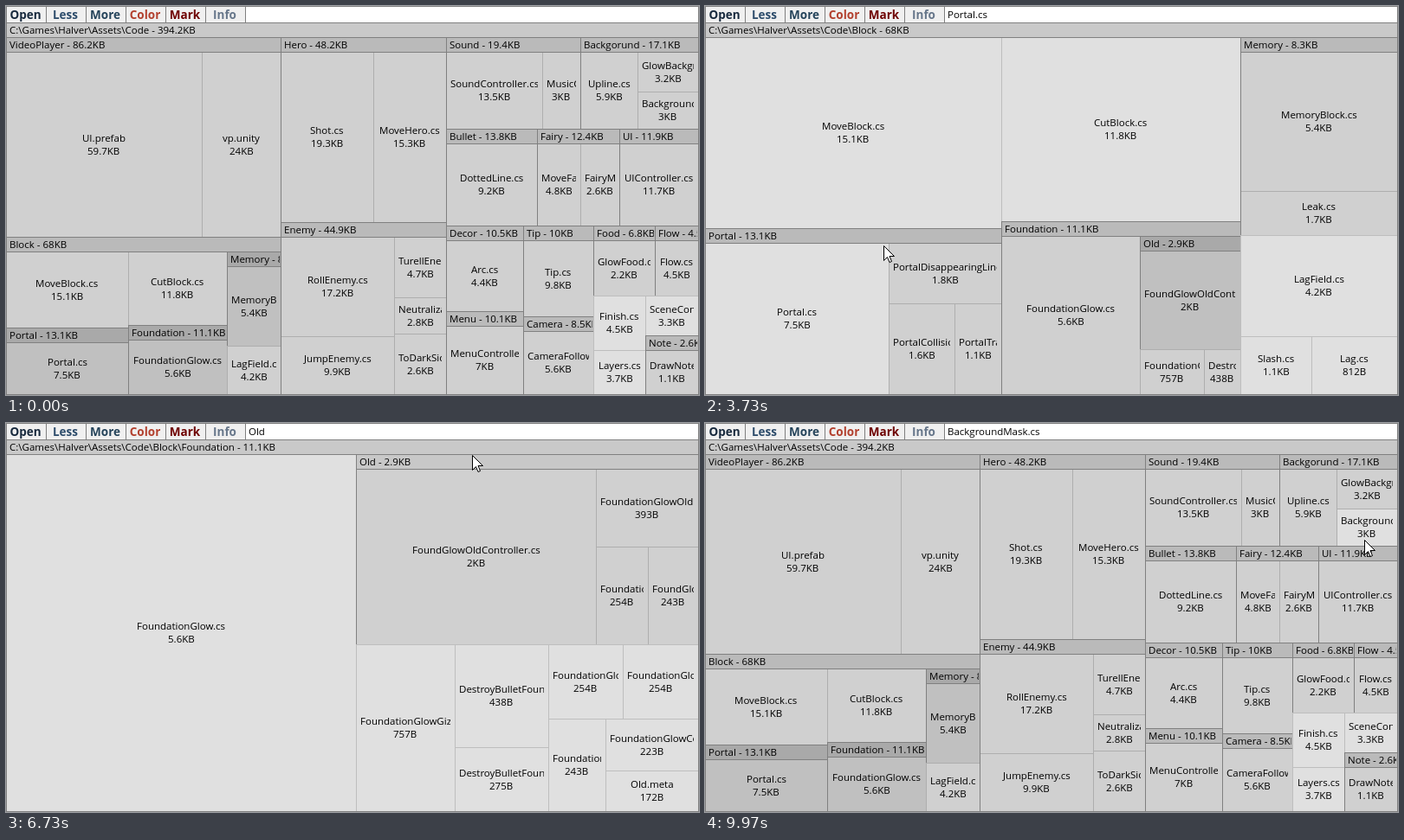
An HTML page with a canvas for the animation above (10 s loop, 800 px wide and 450 px high).

```html
<!DOCTYPE html>
<html lang="en">
<head>
<meta charset="utf-8">
<title>Folder treemap</title>
<style>
  html, body { margin: 0; height: 100%; overflow: hidden; background: #fff; }
  canvas { display: block; }
</style>
</head>
<body>
<canvas id="stage" width="800" height="450"></canvas>
<script>
const ctx = document.getElementById('stage').getContext('2d');
const LOOP = 10000, HEADER = 17;
const FONT = '11.5px "Open Sans", sans-serif';
const BOLD = 'bold 13.5px "Open Sans", sans-serif';
const TILE = [224, 208, 192], HEAD = [201, 186, 169];

// A layout is a file string, a folder, or a split whose items alternate with cut positions.
const across = (...items) => ({ axis: 'x', items });
const down = (...items) => ({ axis: 'y', items });
const folder = (label, child) => ({ label, child });

const code = folder('C:\\Games\\Halver\\Assets\\Code 394.2KB', across(
  down(
    folder('VideoPlayer 86.2KB', across('UI.prefab 59.7KB', 226, 'vp.unity 24KB')), 267,
    folder('Block 68KB', across(
      down('MoveBlock.cs 15.1KB', 372, folder('Portal 13.1KB', 'Portal.cs 7.5KB')), 141,
      down('CutBlock.cs 11.8KB', 369, folder('Foundation 11.1KB', 'FoundationGlow.cs 5.6KB')), 255,
      down(folder('Memory 8.3KB', 'MemoryBlock.cs 5.4KB'), 393, 'LagField.cs 4.2KB')))), 317,
  down(
    folder('Hero 48.2KB', across('Shot.cs 19.3KB', 424, 'MoveHero.cs 15.3KB')), 250,
    folder('Enemy 44.9KB', across(
      down('RollEnemy.cs 17.2KB', 382, 'JumpEnemy.cs 9.9KB'), 448,
      down('TurellEnemy.cs 4.7KB', 337, 'NeutralizationEnemy.cs 2.8KB', 379, 'ToDarkSide.cs 2.6KB')))), 508,
  down(
    across(
      folder('Sound 19.4KB', across('SoundController.cs 13.5KB', 619, 'MusicController.cs 3KB')), 663,
      folder('Backgorund 17.1KB', across('Upline.cs 5.9KB', 729,
        down('GlowBackground.cs 3.2KB', 99, 'BackgroundMask.cs 3KB')))), 142,
    across(
      folder('Bullet 13.8KB', 'DottedLine.cs 9.2KB'), 613,
      folder('Fairy 12.4KB', across('MoveFairy.cs 4.8KB', 663, 'FairyMagic.cs 2.6KB')), 708,
      folder('UI 11.9KB', 'UIController.cs 11.7KB')), 254,
    across(
      down(folder('Decor 10.5KB', 'Arc.cs 4.4KB'), 353, folder('Menu 10.1KB', 'MenuController.cs 7KB')), 597,
      down(folder('Tip 10KB', 'Tip.cs 9.8KB'), 359, folder('Camera 8.5KB', 'CameraFollow.cs 5.6KB')), 678,
      down(
        across(folder('Food 6.8KB', 'GlowFood.cs 2.2KB'), 749, folder('Flow 4.5KB', 'Flow.cs 4.5KB')), 335,
        across(
          down('Finish.cs 4.5KB', 398, 'Layers.cs 3.7KB'), 738,
          down('SceneController.cs 3.3KB', 381, folder('Note 2.6KB', 'DrawNote.cs 1.1KB'))))))));

const block = folder('C:\\Games\\Halver\\Assets\\Code\\Block 68KB', across(
  down('MoveBlock.cs 15.1KB', 257,
    folder('Portal 13.1KB', across('Portal.cs 7.5KB', 212,
      down('PortalDisappearingLine.cs 1.8KB', 344,
        across('PortalCollision.cs 1.6KB', 288, 'PortalTrail.cs 1.1KB'))))), 342,
  down('CutBlock.cs 11.8KB', 249,
    folder('Foundation 11.1KB', across('FoundationGlow.cs 5.6KB', 502,
      down(folder('Old 2.9KB', 'FoundGlowOldController.cs 2KB'), 397,
        across('FoundationGlowGizmo.cs 757B', 576, 'DestroyBulletFoundation.cs 438B'))))), 618,
  down(folder('Memory 8.3KB', down('MemoryBlock.cs 5.4KB', 214, 'Leak.cs 1.7KB')), 265,
    'LagField.cs 4.2KB', 382, across('Slash.cs 1.1KB', 700, 'Lag.cs 812B'))));

const foundation = folder('C:\\Games\\Halver\\Assets\\Code\\Block\\Foundation 11.1KB', across(
  'FoundationGlow.cs 5.6KB', 404,
  down(
    folder('Old 2.9KB', across('FoundGlowOldController.cs 2KB', 681,
      down('FoundationGlowOld.cs 393B', 143,
        across('FoundationGlow.cs.meta 254B', 741, 'FoundGlowOld.cs.meta 243B')))), 256,
    across('FoundationGlowGizmo.cs 757B', 518,
      down('DestroyBulletFoundation.cs 438B', 375, 'DestroyBulletFoundation.cs.meta 275B'), 626,
      down(
        across('FoundationGlow.cs.meta 254B', 712, 'FoundationGlowGizmo.cs.meta 254B'), 342,
        across('Foundation.prefab.meta 243B', 692,
          down('FoundationGlowColor.cs 223B', 402, 'Old.meta 172B')))))));

// Each click opens another folder.
const views = [[0, code], [3350, block], [4750, foundation], [7600, block], [8700, code]];

const mousePath = [
  [30, 799, 200], [1000, 560, 330], [2060, 372, 160], [3090, 204, 276], [3500, 204, 276],
  [3700, 206, 277], [3760, 206, 277], [4600, 367, 259], [5270, 367, 259], [5600, 330, 330],
  [5950, 500, 400], [6300, 560, 190], [6730, 538, 37], [7300, 470, 27], [7900, 470, 27],
  [8360, 456, 27], [8800, 456, 27], [9970, 761, 135]
];

const buttons = [
  ['Open', '#17293d'], ['Less', '#2d4c6b'], ['More', '#24435a'],
  ['Color', '#b2402e'], ['Mark', '#6e0000'], ['Info', '#66768a']
];

const arrow = new Path2D('M.5 .5V17.5L4.5 13.5L7 19.5L9.5 18.5L7 12.5H12.5Z');

const grey = v => `rgb(${v},${v},${v})`;

function mouseAt(t) {
  const i = mousePath.findIndex(key => key[0] > t);
  if (i < 1) return mousePath[i ? mousePath.length - 1 : 0].slice(1);
  const [t0, x0, y0] = mousePath[i - 1], [t1, x1, y1] = mousePath[i];
  const u = (t - t0) / (t1 - t0), e = u * u * (3 - 2 * u);
  return [Math.round(x0 + (x1 - x0) * e), Math.round(y0 + (y1 - y0) * e)];
}

function rect(x, y, right, bottom, fill, line) {
  ctx.fillStyle = fill;
  ctx.fillRect(x, y, right - x, bottom - y);
  frame(x, y, right, bottom, line);
}

function frame(x, y, right, bottom, line) {
  ctx.strokeStyle = line;
  ctx.strokeRect(x + .5, y + .5, right - x, bottom - y);
}

function clipped(x, y, right, bottom, draw) {
  ctx.save();
  ctx.beginPath();
  ctx.rect(x, y, right - x, bottom - y);
  ctx.clip();
  draw();
  ctx.restore();
}

function drawText(text, x, y, color = '#000', font = FONT) {
  ctx.font = font;
  ctx.fillStyle = color;
  ctx.fillText(text, x, y);
}

function drawMap(root, mouse, justOpened) {
  let hovered = '';

  function isHovered(node, name, x, y, right, bottom) {
    const inside = mouse && mouse[0] >= x && mouse[0] < right && mouse[1] >= y && mouse[1] < bottom;
    const hit = justOpened ? node === root : inside;
    if (hit) hovered = name;
    return hit;
  }

  function drawFile(label, x, y, right, bottom, depth) {
    const lines = label.split(' ');
    const hot = isHovered(label, lines[0], x, y, right, bottom);
    rect(x, y, right, bottom, grey(TILE[depth] + (hot ? 16 : 0)), grey(TILE[depth] - 34));
    const middle = Math.floor((y + bottom) / 2);
    clipped(x + 4, y, right - 5, bottom, () => lines.forEach((text, i) => {
      ctx.font = FONT;
      const centred = (x + right - ctx.measureText(text).width) / 2;
      drawText(text, Math.round(Math.max(x + 5, centred)), middle - 3 + 15 * i);
    }));
  }

  function drawFolder(node, x, y, right, bottom, depth) {
    const [path, size] = node.label.split(' '), top = y + HEADER;
    const hot = isHovered(node, path.split('\\').pop(), x, y, right, top);
    const line = grey(128);
    draw(node.child, x, top, right, bottom, depth);
    rect(x, y, right, top, grey(HEAD[depth] + (hot ? (depth ? 14 : 29) : 0)), line);
    clipped(x, y, right - 1, top, () => drawText(`${path} - ${size}`, x + 4, y + 13));
    frame(x, y, right, bottom, line);
  }

  function drawSplit({ axis, items }, x, y, right, bottom, depth) {
    let start = axis === 'x' ? x : y;
    for (let i = 0; i < items.length; i += 2) {
      const end = items[i + 1] ?? (axis === 'x' ? right : bottom);
      if (axis === 'x') draw(items[i], start, y, end, bottom, depth);
      else draw(items[i], x, start, right, end, depth);
      start = end;
    }
  }

  function draw(node, x, y, right, bottom, depth) {
    if (typeof node === 'string') drawFile(node, x, y, right, bottom, depth);
    else if (node.axis) drawSplit(node, x, y, right, bottom, depth);
    else drawFolder(node, x, y, right, bottom, depth + 1);
  }

  drawFolder(root, 0, 19, 799, 449, 0);
  return hovered;
}

function drawToolbar(info) {
  rect(0, 0, 799, 19, '#fff', grey(128));
  buttons.forEach(([text, color], i) => {
    rect(i * 46, 0, i * 46 + 46, 19, grey(240), grey(128));
    ctx.textAlign = 'center';
    drawText(text, i * 46 + 22.5, 15, color, BOLD);
    ctx.textAlign = 'left';
  });
  drawText(info, 280, 14);
}

function drawMouse([x, y]) {
  ctx.save();
  ctx.translate(x, y);
  ctx.fillStyle = '#fff';
  ctx.strokeStyle = '#000';
  ctx.fill(arrow);
  ctx.stroke(arrow);
  ctx.restore();
}

function render(t) {
  const [opened, root] = views.findLast(view => view[0] <= t);
  const mouse = t < 30 ? null : mouseAt(t);
  const justOpened = opened > 0 && String(mouse) === String(mouseAt(opened));
  drawToolbar(drawMap(root, mouse, justOpened));
  if (mouse) drawMouse(mouse);
}

const began = performance.now();
function tick() {
  render((performance.now() - began) % LOOP);
  requestAnimationFrame(tick);
}
render(0);
requestAnimationFrame(tick);
</script>
</body>
</html>
```
